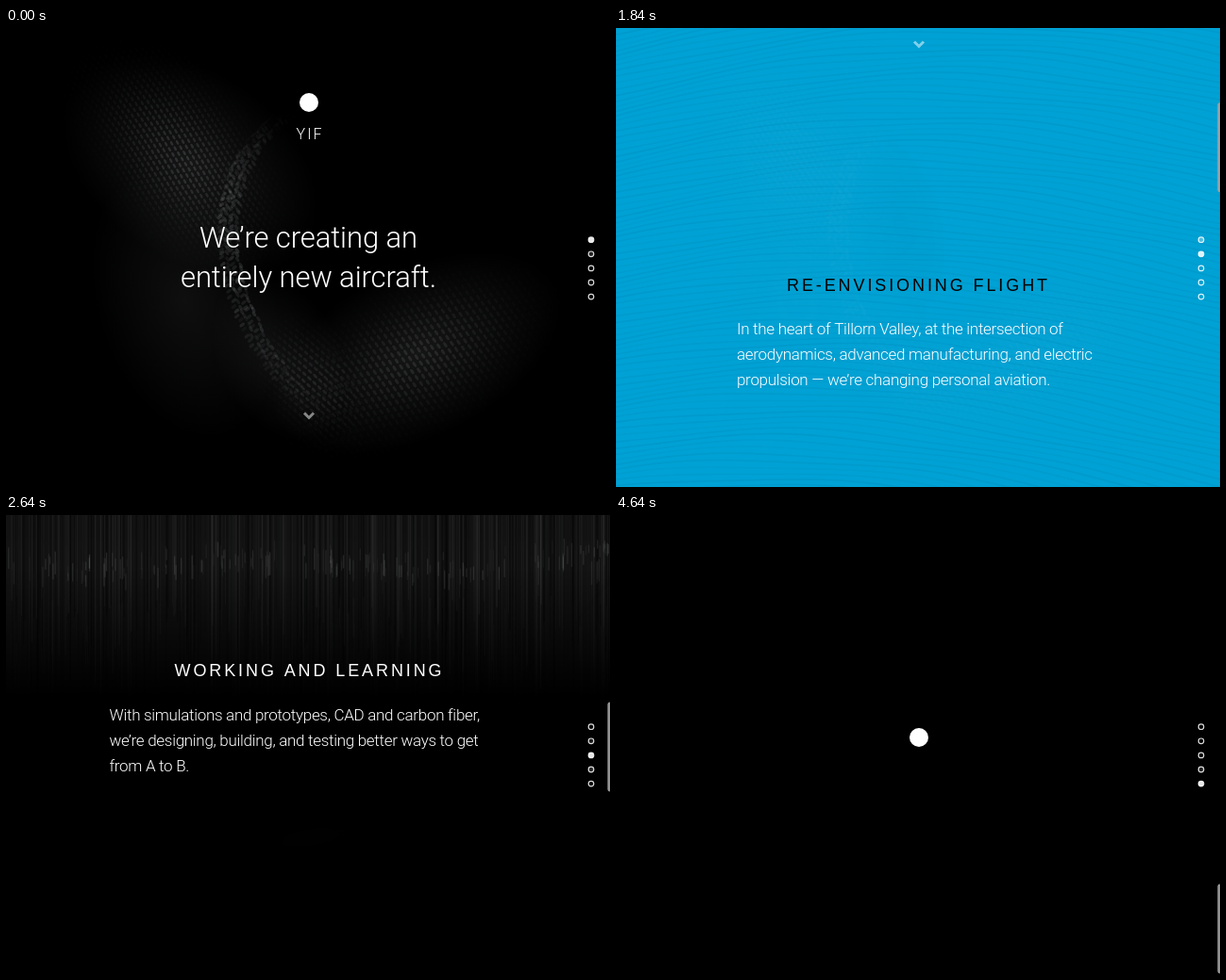
An HTML page with a canvas for the animation above (4720 ms loop, 640 by 487 pixels).

```html
<!DOCTYPE html>
<html lang="en">
<head>
<meta charset="utf-8">
<title>Aircraft page scroll</title>
<style>
html, body { margin: 0; width: 100%; height: 100%; overflow: hidden; background: #000; }
canvas { display: block; width: 640px; height: 487px; }
</style>
</head>
<body>
<canvas id="stage" width="640" height="487"></canvas>
<script>
const W = 640, H = 487, LOOP = 4720, STEP = 80;
const SCROLL = { start: 695, length: 3855, distance: 1948 };
const ctx = document.getElementById('stage').getContext('2d');
const LIGHT = '300 17px Roboto, sans-serif';
const HERO = '300 31px Roboto, sans-serif';
const plain = size => size + 'px "Liberation Sans", Arial, sans-serif';
const clamp = v => Math.max(0, Math.min(1, v));

function makeLayer(height, paint) {
  const canvas = document.createElement('canvas');
  canvas.width = W;
  canvas.height = height;
  paint(canvas.getContext('2d'));
  return canvas;
}

function seeded(seed) {
  return () => (seed = (seed * 16807) % 2147483647) / 2147483647;
}

// ---- Backgrounds ----

function glow(g, x, y, rx, ry, turn, alpha, tone = '205,210,212') {
  g.save();
  g.translate(x, y);
  g.rotate(turn);
  g.scale(rx, ry);
  const fade = g.createRadialGradient(0, 0, 0, 0, 0, 1);
  fade.addColorStop(0, `rgba(${tone},${alpha})`);
  fade.addColorStop(0.5, `rgba(${tone},${alpha * 0.5})`);
  fade.addColorStop(1, `rgba(${tone},0)`);
  g.fillStyle = fade;
  g.fillRect(-1, -1, 2, 2);
  g.restore();
}

// Rows of threads follow "grain"; the lit ellipse follows "turn".
function weave(g, x, y, rx, ry, turn, grain, gap, alpha) {
  const reach = Math.max(rx, ry) * 1.7;
  const cos = Math.cos(turn - grain), sin = Math.sin(turn - grain);
  g.save();
  g.translate(x, y);
  g.rotate(grain);
  for (let row = 0, v = -reach; v < reach; v += gap, row++) {
    for (let u = -reach + (row % 2) * gap * 0.6; u < reach; u += gap * 1.2) {
      const a = alpha * Math.exp(-1.5 * (((u * cos + v * sin) / rx) ** 2 + ((v * cos - u * sin) / ry) ** 2));
      if (a < 0.004) continue;
      g.fillStyle = `rgba(215,222,225,${a})`;
      g.beginPath();
      g.ellipse(u, v + 8 * Math.sin(u / 60), gap * 0.5, gap * 0.24, 0.2, 0, 7);
      g.fill();
    }
  }
  g.restore();
}

const bezier = (a, b, c, d, t) => {
  const k = 1 - t;
  return a * k ** 3 + 3 * b * k * k * t + 3 * c * k * t * t + d * t ** 3;
};

const carbon = makeLayer(H, g => {
  const rand = seeded(88);
  glow(g, 195, 145, 150, 100, 0.6, 0.1);
  glow(g, 190, 290, 95, 150, -0.3, 0.07);
  glow(g, 435, 345, 165, 90, -0.45, 0.1);
  glow(g, 290, 350, 65, 95, -0.5, 0.08);
  weave(g, 188, 140, 100, 58, 0.7, 0.85, 5.5, 0.15);
  weave(g, 435, 350, 115, 55, -0.45, 0.8, 6.5, 0.11);
  weave(g, 325, 375, 60, 40, 0.7, 0.6, 6, 0.1);
  for (let i = 0; i < 76; i++) {
    const t = i / 75;
    const x = bezier(300, 205, 215, 345, t), y = bezier(88, 150, 310, 418, t);
    for (let lane = -2; lane <= 1; lane++) {
      g.fillStyle = `rgba(215,222,225,${(0.05 + rand() * 0.1) * Math.sin(Math.PI * t)})`;
      g.beginPath();
      g.ellipse(x + lane * 6 + rand() * 3, y + rand() * 4, 3.2, 1.7, lane % 2 ? 1 : -0.7, 0, 7);
      g.fill();
    }
  }
  glow(g, 305, 215, 52, 105, -0.2, 0.1, '0,0,0');
});

const waves = makeLayer(H, g => {
  g.lineWidth = 1.6;
  for (let i = -4; i < 92; i++) {
    g.strokeStyle = `rgba(0,35,75,${0.05 + 0.02 * Math.sin(i * 1.7)})`;
    g.beginPath();
    for (let x = 0; x <= W; x += 8) {
      const y = i * 6.5 - 55 * Math.sin(x / 640 * 2.6 + i * 0.012) + 2 * Math.sin(x / 45 + i * 0.6);
      g.lineTo(x, y);
    }
    g.stroke();
  }
});

const fibers = makeLayer(380, g => {
  const rand = seeded(417);
  const tone = a => `rgba(225,228,230,${a})`;
  g.fillStyle = tone(0.085);
  g.fillRect(0, 0, W, 380);
  for (let i = 0; i < 700; i++) {
    const x = rand() * W;
    g.fillStyle = rand() < 0.5 ? `rgba(0,0,0,${rand() * 0.35})` : tone(rand() * 0.06);
    g.fillRect(x, 0, 0.6 + rand() * 1.3, 250 + rand() * 130);
  }
  for (let i = 0; i < 210; i++) {
    const x = rand() * W;
    g.fillStyle = tone(rand() * 0.13);
    g.fillRect(x, 196 + 7 * Math.sin(x / 55) + rand() * 26, 1.4, 8 + rand() * 18);
  }
  const fade = g.createLinearGradient(0, 0, 0, 380);
  [[0, 0.8], [0.58, 1], [0.74, 0.6], [0.96, 0]].forEach(([at, a]) => fade.addColorStop(at, tone(a)));
  g.globalCompositeOperation = 'destination-in';
  g.fillStyle = fade;
  g.fillRect(0, 0, W, 380);
});

const bowl = makeLayer(H, g => {
  const arc = (dy, width, alpha, blur, tone = 215) => {
    g.filter = `blur(${blur}px)`;
    g.strokeStyle = `rgba(${tone},${tone},${tone},${alpha})`;
    g.lineWidth = width;
    g.beginPath();
    g.moveTo(-30, 250 + dy);
    g.bezierCurveTo(190, 332 + dy, 450, 345 + dy, 645, 60 + dy);
    g.stroke();
  };
  arc(75, 95, 0.045, 24);
  arc(38, 62, 0.07, 10);
  arc(16, 18, 0.05, 5);
  arc(0, 6, 0.75, 2, 0);
  arc(-7, 2.5, 0.08, 1);
  g.filter = 'blur(9px)';
  g.lineWidth = 18;
  g.strokeStyle = 'rgba(215,215,215,.045)';
  for (const x of [230, 350, 470]) {
    g.beginPath();
    g.moveTo(x, 40);
    g.lineTo(x - 100, 220);
    g.stroke();
  }
  g.filter = 'none';
  glow(g, 290, 150, 340, 170, 0, 0.05);
  glow(g, 325, 343, 110, 38, -0.1, 0.07);
});

function drawBackground(scroll) {
  const page = scroll / H;
  const weight = i => clamp(1 - Math.abs(page - i));
  const show = (image, i, y = 0) => {
    ctx.globalAlpha = weight(i);
    if (ctx.globalAlpha > 0) ctx.drawImage(image, 0, y);
  };
  const c = weight(1);
  ctx.fillStyle = `rgb(0,${Math.round(199 * c)},${Math.round(262 * c)})`;
  ctx.fillRect(0, 0, W, H);
  show(carbon, 0);
  show(waves, 1);
  show(fibers, 2, -165 - (scroll - 988) * 0.28);
  show(bowl, 3);
  ctx.globalAlpha = 1;
}

// ---- Page content, in page coordinates ----

function text(str, x, y, font, { color = '#fff', spacing = 0, align = 'left' } = {}) {
  ctx.font = font;
  ctx.fillStyle = color;
  ctx.letterSpacing = spacing + 'px';
  ctx.textAlign = align;
  ctx.fillText(str, x, y);
}

const heading = (str, x, y, color) => text(str, x, y, plain(18), { color, spacing: 2.9 });

function paragraph(x, y, lines) {
  lines.forEach((line, i) => text(line, x, y + i * 27, LIGHT, { spacing: -0.3 }));
}

function disc(x, y, r) {
  ctx.beginPath();
  ctx.arc(x, y, r, 0, Math.PI * 2);
}

function emblem(y) {
  ctx.fillStyle = '#fff';
  disc(321, y, 10);
  ctx.fill();
}

function job(x, titleLines) {
  ctx.fillStyle = '#fff';
  ctx.fillRect(x, 1704, 194, 2);
  titleLines.forEach((line, i) => text(line, x, 1753 + i * 22, plain(20)));
  const y = 1753 + titleLines.length * 22;
  text('View Job Description', x, y - 1, plain(10), { color: '#5a5a5a' });
  text('Apply', x, y + 19, plain(10), { color: '#00bfff' });
}

function drawPage() {
  emblem(79);
  text('YIF', 322, 118, '300 16px Roboto, sans-serif', { spacing: 2, align: 'center' });
  const hero = { spacing: -0.1, align: 'center' };
  text('We’re creating an', 320.5, 233, HERO, hero);
  text('entirely new aircraft.', 320.5, 275, HERO, hero);

  ctx.strokeStyle = 'rgba(255,255,255,.5)';
  ctx.lineWidth = 3;
  ctx.beginPath();
  ctx.moveTo(316, 408.5);
  ctx.lineTo(321, 413.5);
  ctx.lineTo(326, 408.5);
  ctx.stroke();

  heading('RE-ENVISIONING FLIGHT', 181, 673, '#000');
  paragraph(128, 719, [
    'In the heart of Tillorn Valley, at the intersection of',
    'aerodynamics, advanced manufacturing, and electric',
    'propulsion — we’re changing personal aviation.'
  ]);

  heading('WORKING AND LEARNING', 178.5, 1159);
  paragraph(109.5, 1206, [
    'With simulations and prototypes, CAD and carbon fiber,',
    'we’re designing, building, and testing better ways to get',
    'from A to B.'
  ]);

  heading('JOINING THE TEAM', 207, 1536);
  paragraph(109.5, 1583, [
    'We’re looking for talented, curious people who love',
    'hard problems and want to help us make the',
    'impossible happen.'
  ]);
  job(110, ['Aerodynamics', 'Engineer']);
  job(321, ['Controls Engineer']);

  emblem(2184);
}

// ---- Fixed controls ----

function drawDots(scroll) {
  let page = scroll / H;
  if (page > 3) page = 3 + Math.max(0, (page - 3.35) / 0.65);
  ctx.lineWidth = 1.2;
  ctx.strokeStyle = 'rgba(255,255,255,.85)';
  for (let i = 0; i < 5; i++) {
    disc(620, 224.7 + i * 15.1, 2.8);
    ctx.fillStyle = `rgba(255,255,255,${0.9 * clamp(1.15 - Math.abs(page - i))})`;
    ctx.fill();
    ctx.stroke();
  }
}

function drawThumb(scroll) {
  ctx.fillStyle = 'rgba(165,165,165,.9)';
  ctx.beginPath();
  ctx.roundRect(637.4, scroll * 0.201, 7, 95, 3);
  ctx.fill();
}

function frame(now) {
  const t = Math.floor((now % LOOP) / STEP) * STEP;
  const p = clamp((t - SCROLL.start) / SCROLL.length);
  const scroll = SCROLL.distance * (1 - Math.cos(Math.PI * p)) / 2;
  drawBackground(scroll);
  ctx.save();
  ctx.translate(0, -Math.round(scroll));
  drawPage();
  ctx.restore();
  drawDots(scroll);
  if (p > 0) drawThumb(scroll);
}

const begin = performance.now();
function tick() {
  frame(performance.now() - begin);
  requestAnimationFrame(tick);
}
tick();
</script>
</body>
</html>
```
